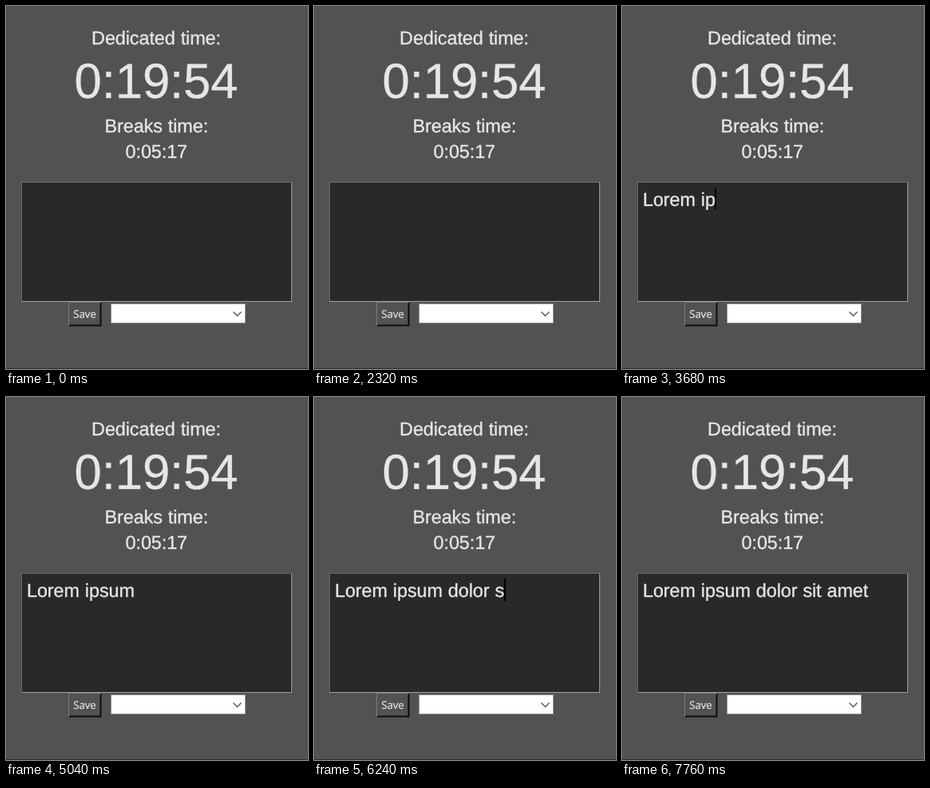
Animation of 378 by 454 pixels, one loop 8 s. Source, as an HTML page:

```html
<!DOCTYPE html>
<html lang="en">
<head>
<meta charset="utf-8">
<title>Time tracker</title>
<style>
  html, body { margin: 0; width: 100%; height: 100%; overflow: hidden; background: #525252; }
  svg { display: block; }
  text {
    font: 23.4px "Liberation Sans", Arial, sans-serif;
    letter-spacing: -0.09px;
    word-spacing: 0.6px;
    text-rendering: geometricPrecision;
    white-space: pre;
    fill: #e6e6e6;
    stroke: #e6e6e6;
    stroke-width: 0.35px;
  }
  .center { text-anchor: middle; }
  .big { font-size: 61.6px; }
  .button { font: 13.3px "Open Sans", sans-serif; stroke-width: 0.2px; }
</style>
</head>
<body>
<svg width="378" height="454" viewBox="0 0 378 454">
  <rect width="378" height="454" fill="#525252"/>
  <rect y="453" width="378" height="1" fill="#302c2e"/>

  <text class="center" x="188" y="48">Dedicated time:</text>
  <text class="center big" x="188" y="115">0:19:54</text>
  <text class="center" x="188.3" y="158">Breaks time:</text>
  <text class="center" x="188.3" y="190">0:05:17</text>

  <!-- notes field -->
  <rect x="19" y="220" width="339" height="150" fill="#a0a0a0"/>
  <path d="M19 370V220H358L357 221H20V369Z" fill="#6c6c6c"/>
  <rect x="20" y="221" width="337" height="148" fill="#292929"/>
  <text id="note" x="26" y="250"></text>
  <rect id="caret" y="227" width="2" height="28" fill="#000"/>

  <!-- save button -->
  <rect x="78" y="370" width="41.5" height="30.5" fill="#0c0c0c"/>
  <path d="M78 400.5V370H119.5L118 371.5H79.5V399Z" fill="#7a7a7a"/>
  <rect x="79" y="371" width="38.5" height="27.5" fill="#525252"/>
  <text class="button" x="84.2" y="390">Save</text>

  <!-- drop-down -->
  <rect x="131.5" y="372.5" width="168" height="24" fill="#fff" stroke="#8c8c8c"/>
  <path d="M284.5 382.5l5 5 5-5" fill="none" stroke="#555" stroke-width="1.4"/>
</svg>
<script>
const LOOP = 8000, STEP = 80;
const PHRASE = "Lorem ipsum dolor sit amet";
// Time in ms at which each character is typed
const KEYS = [
  2400, 2560, 2640, 2720, 2960, 3120,
  3440, 3600, 4080, 4240, 4480, 4560,
  5200, 5280, 5440, 5520, 5600, 5840,
  6240, 6400, 6800, 6960,
  7120, 7280, 7440, 7600
];
const BLINK = { start: 792, period: 902, on: 604 };
const note = document.getElementById("note");
const caret = document.getElementById("caret");

function caretVisible(t) {
  return t >= 880 && (t - BLINK.start) % BLINK.period < BLINK.on;
}

function draw(now) {
  const t = Math.floor((now % LOOP) / STEP) * STEP;
  const typed = PHRASE.slice(0, KEYS.filter(key => key <= t).length);
  if (note.textContent !== typed) note.textContent = typed;
  const width = typed ? note.getComputedTextLength() : 0;
  caret.setAttribute("x", Math.floor(26 + width));
  caret.setAttribute("visibility", caretVisible(t) ? "visible" : "hidden");
}

const began = performance.now();
function tick() {
  draw(performance.now() - began);
  requestAnimationFrame(tick);
}
tick();
</script>
</body>
</html>
```
